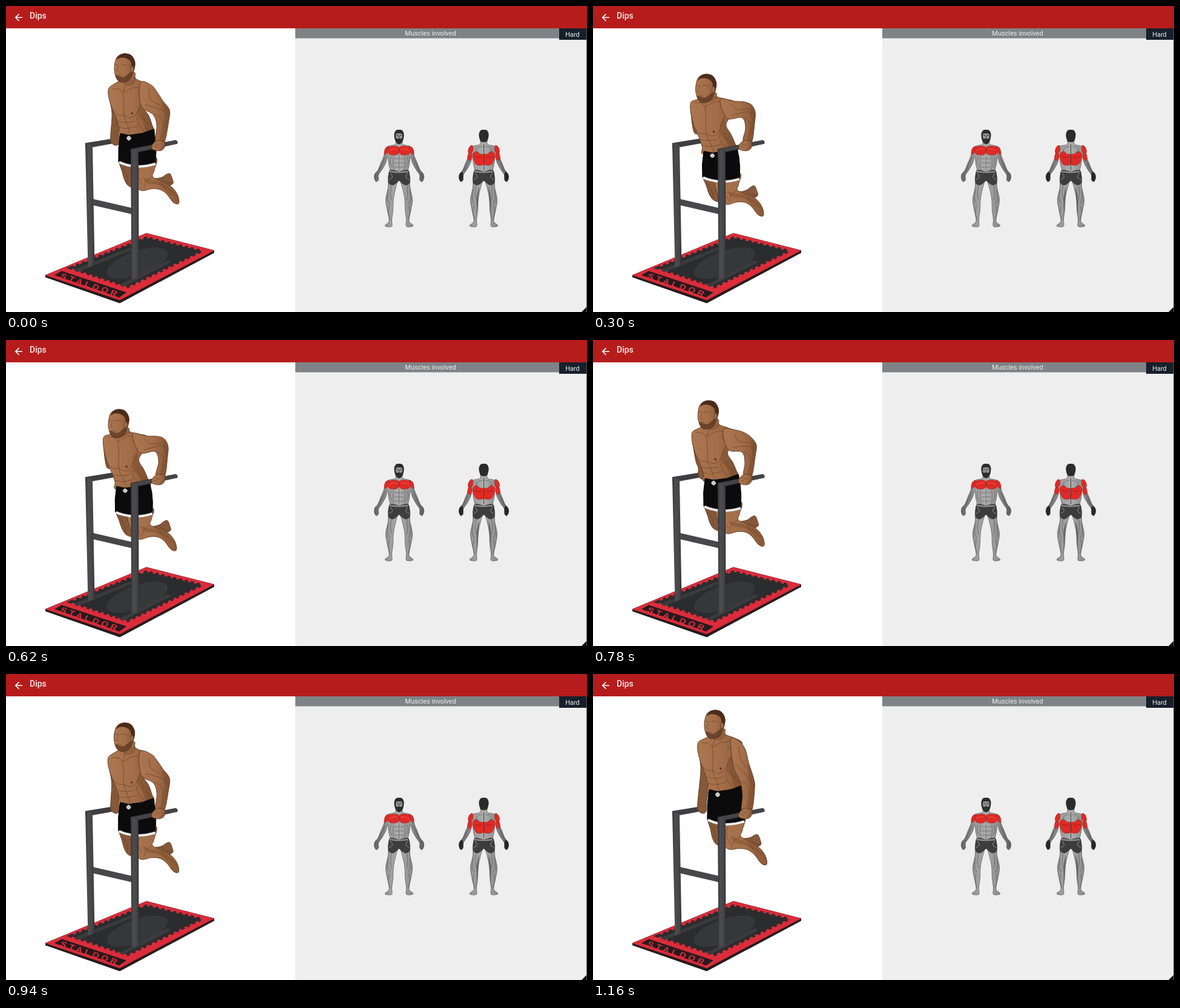
An HTML page that plays this animation: 960 by 507 pixels, repeating every 1.24 s.

```html
<!DOCTYPE html>
<html lang="en">
<head>
<meta charset="utf-8">
<title>Dips</title>
<style>
html, body { margin: 0; width: 100%; height: 100%; overflow: hidden; background: #fff; }
svg { display: block; width: 100vw; height: 100vh; }
text { font-family: Roboto, "Open Sans", sans-serif; }
.skin { fill: url(#skin); stroke: #5d3a22; stroke-width: .9; }
.far { fill: #85583a; stroke: #53331f; stroke-width: .8; }
.shade { fill: #5a341b; opacity: .25; }
.line { fill: none; stroke: #54301a; stroke-width: 1; opacity: .5; stroke-linecap: round; }
.red { fill: #df2a25; stroke: #9f1c1a; stroke-width: .5; }
.cut { fill: none; stroke: #333; stroke-width: .7; opacity: .6; }
</style>
</head>
<body>
<svg viewBox="0 0 960 507" preserveAspectRatio="none">
  <defs>
    <linearGradient id="skin">
      <stop offset="0" stop-color="#ab7750"/><stop offset=".55" stop-color="#a26d48"/><stop offset="1" stop-color="#8a5939"/>
    </linearGradient>
    <linearGradient id="steel">
      <stop offset="0" stop-color="#343436"/><stop offset=".3" stop-color="#4d4d50"/><stop offset=".75" stop-color="#464649"/><stop offset="1" stop-color="#303032"/>
    </linearGradient>
    <linearGradient id="grey">
      <stop offset="0" stop-color="#626262"/><stop offset=".3" stop-color="#9b9b9b"/><stop offset=".5" stop-color="#adadad"/><stop offset=".75" stop-color="#8d8d8d"/><stop offset="1" stop-color="#5c5c5c"/>
    </linearGradient>
  </defs>

  <rect width="960" height="507" fill="#fff"/>
  <rect x="478" y="37" width="482" height="470" fill="#eee"/>
  <rect x="478" y="37" width="436" height="16.5" fill="#7f8387"/>
  <rect x="959" y="37" width="1" height="470" fill="#55585c"/>
  <rect x="914" y="37" width="45" height="19" fill="#17202a"/>
  <path d="M951 507L959 499V507Z" fill="#111"/>
  <rect width="960" height="37" fill="#b71c1c"/>
  <path d="M27 19H16M21.5 13.3L15.8 19L21.5 24.7" fill="none" stroke="#fff" stroke-width="1.7"/>
  <text x="39" y="21" font-size="14" font-weight="500" fill="#f7e9e9">Dips</text>
  <text x="701.5" y="49" font-size="11" text-anchor="middle" fill="#eee">Muscles involved</text>
  <text x="936" y="51" font-size="11" text-anchor="middle" fill="#eee">Hard</text>

  <g id="charts"></g>

  <!-- mat -->
  <path d="M65 446L188 487L344 405V409L188 492.5L65 449.5Z" fill="#241a1c"/>
  <path d="M65 446L232 376.5L344 405L188 487.5Z" fill="#dc2c3a" stroke="#7d1a24" stroke-width=".7"/>
  <path d="M107 434L232 384L323 406L201 465Z" fill="#2b2c2e" stroke="#2b2c2e" stroke-width="5" stroke-dasharray="5 5"/>
  <path d="M80 446L92 439L199 474.5L187 483Z" fill="#261a1d"/>
  <ellipse cx="217" cy="426" rx="53" ry="20" transform="rotate(-20 217 426)" fill="#363739"/>
  <text transform="matrix(.95 .315 -.4 .78 88.5 450.5)" font-size="15" font-weight="700" letter-spacing="4.4" fill="#d92d3a" style="font-family:'Liberation Sans',Arial,sans-serif">STALDOR</text>

  <!-- far side of the stand -->
  <path d="M112 437L205 400L209 404L118 441Z" fill="#3b3b3d"/>
  <path d="M131 227L187 218V226L143 234H131Z" fill="#3e3e41"/>
  <path d="M131 227L143 231L146.5 430L135.5 433Z" fill="url(#steel)"/>
  <path d="M143 320L208 335V344.5L143 329.5Z" fill="#48484b" stroke="#333" stroke-width=".7"/>

  <g id="man"></g>

  <!-- near side of the stand -->
  <path d="M187 462L268 421L272 425L194 465Z" fill="#3b3b3d"/>
  <path d="M206 237L280 222.5Q284 223 283 228L219 242L206 246Z" fill="#454548" stroke="#2f2f31" stroke-width=".7"/>
  <path d="M206 238L219 241L219.5 450L207.5 453Z" fill="url(#steel)"/>
  <path class="skin" d="M241 231Q245 224 251 222L262 224Q264 231 261 236Q256 242 246 239Q239 238 241 231Z"/>
  <path class="line" d="M243 232L249 234M246 228L253 231M254 238L260 232"/>
</svg>
<script>
const LOOP = 1240;
const STEPS = [0, 70, 150, 230, 300, 380, 470, 550, 620, 700, 780, 850, 940, 1020, 1080, 1160];
const DROP = [0, 12, 23, 30, 34, 36.5, 37.5, 37.5, 36, 30, 21.5, 12, 2, -9, -15, -19];

// Four key poses, ordered by how far the head has dropped
const KEYS = [-19, 0, 22.5, 34.5];
const SHIFT = {
  head:     [[5, 0, -6, -9.5], [-19, 0, 22.5, 34.5]],
  shoulder: [[4, 0, -6, -8],   [-23, 0, 17, 23]],
  chest:    [[3, 0, -6, -8.5], [-21, 0, 21, 31]],
  waist:    [[3, 0, -4, -6],   [-19.5, 0, 19, 30]],
  hem:      [[3, 0, -3, -5],   [-17, 0, 18, 25.5]],
  knee:     [[1, 0, -2, -3],   [-16, 0, 16, 24]],
  foot:     [[1.5, 0, -3, -4], [-11.5, 0, 14.5, 20.5]]
};
const LEVELS = [[112, "head"], [137, "shoulder"], [178, "chest"], [212, "waist"], [262, "hem"], [298, "knee"]];
const ARM = [
  [228,108, 243,113, 252,126, 257,146, 266,175, 267,190, 262,227, 246,227, 247,200, 243,178, 232,152],
  [222,127, 240,131, 250,143, 259,157, 270,172, 269,190, 261,227, 247,227, 249,198, 243,180, 223,165],
  [215,150, 236,150, 252,155, 264,164, 270,175, 268,193, 262,226, 249,224, 251,203, 246,186, 223,182],
  [210,155, 232,158, 250,159, 262,164, 268,176, 267,194, 262,226, 248,224, 252,202, 246,185, 221,186]
];

const mix = (a, b, k) => a + (b - a) * k;
const clamp = k => Math.max(0, Math.min(1, k));
const pairs = flat => Array.from({ length: flat.length / 2 }, (_, i) => [flat[2 * i], flat[2 * i + 1]]);
const parse = s => pairs(s.trim().split(/[\s,]+/).map(Number));
const fix = v => v.toFixed(2);

function curve(pts, closed = true) {
  const n = pts.length;
  const at = i => closed ? pts[(i + n) % n] : pts[Math.max(0, Math.min(n - 1, i))];
  let d = "M" + pts[0].map(fix);
  for (let i = 0; i < (closed ? n : n - 1); i++) {
    const [a, b, c, e] = [at(i - 1), at(i), at(i + 1), at(i + 2)];
    const ctl = [b[0] + (c[0] - a[0]) / 6, b[1] + (c[1] - a[1]) / 6,
                 c[0] - (e[0] - b[0]) / 6, c[1] - (e[1] - b[1]) / 6, c[0], c[1]];
    d += "C" + ctl.map(fix);
  }
  return closed ? d + "Z" : d;
}
const poly = pts => "M" + pts.map(p => p.map(fix)).join("L") + "Z";

// Blend of the key poses for a given drop
function keyMix(drop, values) {
  let i = 0;
  while (i < 2 && drop > KEYS[i + 1]) i++;
  return mix(values[i], values[i + 1], (drop - KEYS[i]) / (KEYS[i + 1] - KEYS[i]));
}
const shift = (part, drop) => SHIFT[part].map(v => keyMix(drop, v));

function warp([x, y], drop) {
  let i = 0;
  while (i < LEVELS.length - 2 && y > LEVELS[i + 1][0]) i++;
  const [y0, a] = LEVELS[i], [y1, b] = LEVELS[i + 1];
  const k = clamp((y - y0) / (y1 - y0)), s = shift(a, drop), t = shift(b, drop);
  let off = [mix(s[0], t[0], k), mix(s[1], t[1], k)];
  if (y > 268) {
    const f = shift("foot", drop), r = clamp((x - 215) / 55);
    off = off.map((v, j) => mix(v, f[j], r));
  }
  return [x + off[0], y + off[1]];
}

const NS = "http://www.w3.org/2000/svg";
const man = document.getElementById("man");
const parts = [];
function add(cls, shape, attrs = {}) {
  const el = document.createElementNS(NS, "path");
  if (cls) el.setAttribute("class", cls);
  for (const k in attrs) el.setAttribute(k, attrs[k]);
  man.append(el);
  parts.push(drop => el.setAttribute("d", shape(drop)));
}
function body(cls, s, draw = curve, attrs) {
  const pts = parse(s);
  add(cls, drop => draw(pts.map(p => warp(p, drop))), attrs);
}
const open = pts => curve(pts, false);
const line = s => body("line", s, open);

// far arm
add("far", drop => {
  const x = keyMix(drop, [0, 0, 1, 6]), w = (a, b) => warp([a, b], drop);
  return curve([w(171, 145), w(175, 178), [173 + x, 212], [173 + x, 225], [181, 231], [187, 227], [188, 210], w(192, 180)]);
});

// legs
body("far", "188,250 192,275 197,291 204,299 216,301 238,300 256,297 268,298 276,294 275,287 271,278 265,279 257,284 243,286 226,284 226,255");
line("258,285 263,291 274,294");
body("skin", "206,250 208,282 214,299 225,306 240,303 254,304 265,311 276,325 284,328 286,323 283,312 275,301 264,294 251,288 242,282 245,272 247,250");
body("shade", "226,284 238,288 256,292 270,301 284,318 272,308 252,297 234,294");
line("220,270 219,284 226,296");
line("242,283 232,290 228,301");
line("258,294 263,303 273,313");
line("193,268 200,282 201,294");

// torso
body("skin", "191,113 190,122 179,129 170,136 169,147 172,160 177,174 183,188 187,204 187,216 215,219 244,212 241,196 236,182 228,168 240,150 242,136 228,127 214,120 212,110");
body("shade", "222,160 229,169 237,184 242,204 232,208 226,192 217,180");
body("shade", "192,122 204,123 212,116 215,123 207,132 196,131");
line("176,172 184,180 195,181 204,185 214,181 221,168");
line("193,144 195,160 195,181 201,198 205,212");
line("176,137 187,138 194,143 208,136 226,134");
line("200,124 196,134 194,142");
line("185,191 198,193 212,191");
line("187,201 200,203 218,199");
line("216,184 219,196 228,207");
line("225,180 229,190 237,199");
line("218,142 226,152 223,166");
body("", "206,177 208,176 210,178 208,180", curve, { fill: "#63391f" });

// shorts
body("", "189,211 203,214 225,211 244,204 247,222 248,240 247,262 232,266 216,267 200,264 186,258 186,235", poly,
  { fill: "#0b0b0c", stroke: "#050505", "stroke-width": 1, "stroke-linejoin": "round" });
body("", "187,259 200,263.5 216,266 232,265 247,261.5", open, { fill: "none", stroke: "#8d8680", "stroke-width": 4.6 });
body("", "187,259 200,263.5 216,266 232,265 247,261.5", open, { fill: "none", stroke: "#f7f7f7", "stroke-width": 3.4 });
body("", "199,219 203,215 207,219 203,223", curve, { fill: "#c9c9c9" });

// near arm
const armPoint = (drop, i) => [0, 1].map(j => keyMix(drop, ARM.map(a => a[2 * i + j])));
const between = (a, b, k) => [mix(a[0], b[0], k), mix(a[1], b[1], k)];
add("skin", drop => curve(ARM[0].slice(0, 11).map((_, i) => armPoint(drop, i))));
function armLine(...spec) {
  add("line", drop => open(spec.map(([a, b, k]) => between(armPoint(drop, a), armPoint(drop, b), k))));
}
armLine([1, 10, .2], [2, 10, .45], [3, 10, .35], [3, 9, .3]);
armLine([9, 4, .1], [9, 5, .45], [8, 5, .55], [7, 6, .5]);
armLine([10, 3, .2], [9, 3, .45], [9, 4, .7]);
add("shade", drop => curve([[3, 9, .1], [4, 9, .02], [5, 8, .02], [6, 7, .05], [6, 7, .35], [5, 8, .35], [4, 9, .35]]
  .map(([a, b, k]) => between(armPoint(drop, a), armPoint(drop, b), k))));

// head
const headPart = (cls, s, attrs, draw = curve) => {
  const pts = parse(s);
  add(cls, drop => {
    const [x, y] = shift("head", drop);
    return draw(pts.map(p => [p[0] + x, p[1] + y]));
  }, attrs);
};
headPart("skin", "180,94 184,84 195,79 207,82 213,93 212,104 209,114 203,123 192,126 185,123 181,116 179,106");
headPart("", "183,89 188,81 197,78.5 207,81.5 213,92 212,104 208,103 206,92 197,86 188,86", { fill: "#4b2b1c" });
headPart("", "181,115 187,116 194,118 203,112 209,107 208,116 202,124 192,126.5 185,124", { fill: "#5a3521", opacity: .75 });
headPart("skin", "207,101 210,100 211,105 208,110 206,106");
headPart("line", "180,97 184,98 186,97", { "stroke-width": 1.4 }, open);
headPart("line", "190,98 195,97 200,99", { "stroke-width": 1.4 }, open);
headPart("line", "186,99 183,108 187,109", {}, open);
headPart("line", "183,115 187,114 192,116", {}, open);

// muscle charts: half outlines around x = 0, mirrored
const flip = pts => pts.map(([x, y]) => [-x, y]);
const whole = s => { const p = parse(s); return curve(p.concat(flip(p).reverse())); };
const path = (d, attrs) => `<path d="${d}" ${attrs}/>`;
const both = (s, attrs, draw = curve) => {
  const p = parse(s);
  return path(draw(p), attrs) + path(draw(flip(p)), attrs);
};
const OUTLINE = "5,220 6,229 17,232 23,237 25,248 30,260 35,272 40,278 41,285 38,291 34,288 34,280 28,271 22,260 19,250 17,262 15,273 18,284 18,300 22,320 20,336 17,350 17,358 23,363 21,365.5 12,365 12,354 10,338 9,318 4,296 1,290";
const SHORTS = "1,274 15,272 18,285 17,294 11,297 5,294 1,290";
const cut = 'class="cut"', red = 'class="red"';
const base = path(whole(OUTLINE), 'fill="url(#grey)" stroke="#555" stroke-width=".7"')
  + path(whole(SHORTS), 'fill="#3d3d3d"')
  + path("M-15 274Q0 277 15 274", 'fill="none" stroke="#c9c9c9" stroke-width="2" stroke-dasharray="2 1"')
  + both("15,276 11,283 17,288", 'fill="none" stroke="#aaa" stroke-width=".8"', open)
  + both("13,298 14,312 12,322", cut, open) + both("18,304 19,320 15,328", cut, open)
  + both("16,331 18,342 15,354", cut, open) + both("23,250 27,260 34,273", cut, open);

const front = base
  + both("1,234 9,232 18,235 19,241 15,246 7,247 1,244", red)
  + both("16,233 21,234 24,240 24,246 20,244 18,238", red)
  + both("3,237 10,237 17,240", 'fill="none" stroke="#f2685f" stroke-width=".8"', open)
  + path("M0 232V273M-8 253H8M-8 260H8M-7 267H7", cut)
  + both("9,249 10,260 8,272", cut, open) + both("13,250 15,258 11,268", cut, open)
  + path(curve(parse("-8,212 -5,206 0,205 5,206 8,212 7,221 4,227 0,229 -4,227 -7,221")), 'fill="#2c2c2c"')
  + path(curve(parse("-5,212 0,211 5,212 5,219 2,220 0,219 -2,220 -5,219")), 'fill="#929292"')
  + path("M-4.5 214.3H-1.3M1.3 214.3H4.5M0 215V218M-2 223H2", 'stroke="#333" stroke-width="1"');

const back = base
  + both("19,231 24,234 26,242 22,245 18,239", red)
  + both("20,246 25,244 27,253 24,256 21,254", red)
  + both("0,247 7,245 12,241 18,245 17,254 13,262 6,264 0,261", red)
  + path("M0 229V272", 'stroke="#444" stroke-width="1"')
  + both("2,233 9,234 13,240 7,244", cut, open)
  + both("4,250 9,251 15,249", 'fill="none" stroke="#8d1715" stroke-width=".8"', open)
  + both("36,275 40,279 41,285 38,291 35,288 34,280", 'fill="#262626"')
  + both("8,300 12,318 12,340 14,358 11,340 9,320", 'fill="#444" opacity=".6"')
  + path(curve(parse("-8,212 -5,206 0,205 5,206 8,212 7,220 4,225 -4,225 -7,220")), 'fill="#2b2b2b"');

document.getElementById("charts").innerHTML =
  `<g transform="translate(649.5 0)">${front}</g><g transform="translate(789.5 0)">${back}</g>`;

let shown = -1;
function render(now) {
  const t = now % LOOP;
  const step = STEPS.filter(s => s <= t).length - 1;
  if (step !== shown) {
    shown = step;
    parts.forEach(set => set(DROP[step]));
  }
}
function tick(now) {
  render(now);
  requestAnimationFrame(tick);
}
render(0);
requestAnimationFrame(tick);
</script>
</body>
</html>
```
